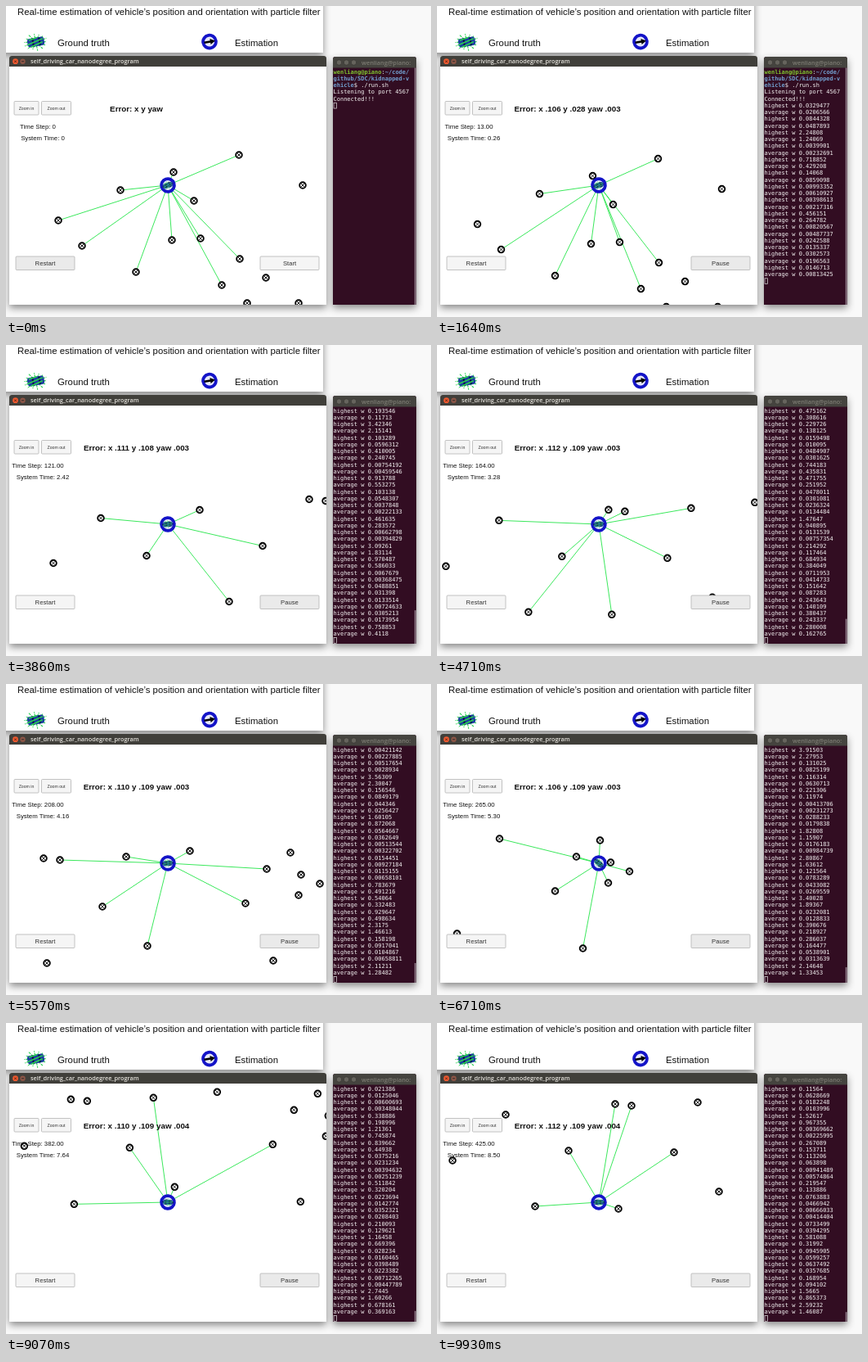
These frames come from a looping animation (520 by 380 pixels, 10000 ms). An HTML page:

```html
<!DOCTYPE html>
<html lang="en">
<head>
<meta charset="utf-8">
<title>Particle filter</title>
<style>
html, body { margin: 0; width: 100%; height: 100%; overflow: hidden; background: #f9f9f9; }
svg { display: block; width: 520px; height: 380px; }
text { font-family: "Liberation Sans", Arial, sans-serif; fill: #111; white-space: pre; }
.head { font-size: 11.35px; }
.bar { font: 600 7.3px "Open Sans", sans-serif; fill: #e4e2dc; }
.error { font-size: 9.8px; font-weight: bold; }
.info { font-size: 7.8px; }
.btn { font-size: 7.7px; fill: #333; }
.zoom { font-size: 5.2px; fill: #333; }
.mid { text-anchor: middle; }
.term text { font: 7px "DejaVu Sans Mono", monospace; fill: #f6f4f4; }
.term .user { fill: #7fc22e; font-weight: bold; }
.term .path { fill: #729fcf; font-weight: bold; }
</style>
</head>
<body>
<svg viewBox="0 0 520 380">
  <defs>
    <filter id="shadow" x="-10%" y="-20%" width="120%" height="150%">
      <feDropShadow dx="0" dy="4" stdDeviation="5" flood-color="#000" flood-opacity=".45"/>
    </filter>
    <clipPath id="view"><rect x="4" y="74" width="388" height="291"/></clipPath>
    <clipPath id="termTitle"><rect x="400" y="62" width="95" height="14"/></clipPath>
    <g id="mark">
      <circle r="3.8" fill="#fff" stroke="#000" stroke-width="1.9"/>
      <path d="M-2.5-2.5L2.5 2.5M-2.5 2.5L2.5-2.5" stroke="#000" stroke-width=".9"/>
    </g>
    <g id="estimate">
      <circle r="7.9" fill="#e6e8fb" stroke="#1414c8" stroke-width="3.8"/>
      <path d="M-6.5-1.3H1V-3.6L7 0L1 3.6V1.3H-6.5Z" fill="#000"/>
    </g>
    <g id="vehicle">
      <rect x="-9" y="-4.6" width="18" height="9.2" rx="3" fill="#1c3fa0"/>
      <path d="M-3-4.6V4.6M4-4V4" stroke="#0b1440" stroke-width="1.8"/>
      <path d="M-9 1.5L8-2.5M-6 4.5L7 1M-7-3L2-4.5" stroke="#2bd152" stroke-width="1.3"/>
    </g>
    <g id="rays" stroke="#2bd152" stroke-width="1" fill="none"></g>
  </defs>

  <rect width="520" height="380" fill="#f9f9f9"/>
  <rect x="-12" y="-20" width="400" height="77" fill="#fff" filter="url(#shadow)"/>
  <text class="head" x="14" y="10.6">Real-time estimation of vehicle’s position and orientation with particle filter</text>
  <g transform="translate(36.5 44) rotate(-10) scale(1.15)">
    <use href="#rays"/><use href="#vehicle"/>
  </g>
  <text class="head" x="63" y="49">Ground truth</text>
  <use href="#estimate" transform="translate(249 43.6) rotate(-10)"/>
  <text class="head" x="280" y="49">Estimation</text>

  <path d="M4 365V64Q4 61 7 61H389Q392 61 392 64V365Z" fill="#fff" filter="url(#shadow)"/>
  <path d="M4 74V64Q4 61 7 61H389Q392 61 392 64V74Z" fill="#403f3a"/>
  <circle cx="11.5" cy="67.7" r="3.4" fill="#ee5a30"/>
  <path d="M10.2 66.4l2.6 2.6m0-2.6l-2.6 2.6" stroke="#4a1a0c" stroke-width=".8"/>
  <circle cx="20.5" cy="67.7" r="3.2" fill="#8b5546"/>
  <path d="M19 67.7h3" stroke="#2c2b28" stroke-width=".9"/>
  <text class="bar" x="30" y="70.4">self_driving_car_nanodegree_program</text>

  <g clip-path="url(#view)">
    <path id="beams" stroke="#3be85c" fill="none"/>
    <g id="marks"></g>
    <g id="car">
      <use href="#estimate"/>
      <use href="#rays" transform="scale(.55)"/>
      <use href="#vehicle" transform="scale(.65)"/>
    </g>
    <text id="error" class="error mid" x="159.5" y="129.2"></text>
    <text id="step" class="info mid" x="39" y="149.5"></text>
    <text id="clock" class="info mid" x="45" y="164"></text>
    <g fill="#f5f5f5" stroke="#b4b4b4" stroke-width=".8">
      <rect x="10" y="116.5" width="30" height="16.5" rx="1"/>
      <rect x="43.5" y="116.5" width="36" height="16.5" rx="1"/>
      <rect id="restartFace" x="12" y="306" width="72" height="16.5" rx="1"/>
      <rect id="runFace" x="311" y="306" width="72" height="16.5" rx="1"/>
    </g>
    <text class="zoom mid" x="25" y="126.8">Zoom in</text>
    <text class="zoom mid" x="61.5" y="126.8">Zoom out</text>
    <text class="btn mid" x="48" y="317">Restart</text>
    <text id="run" class="btn mid" x="347" y="317"></text>
  </g>

  <path d="M400 365V65Q400 62 403 62H499Q502 62 502 65V365Z" fill="#300a24" filter="url(#shadow)"/>
  <path d="M400 75.5V65Q400 62 403 62H499Q502 62 502 65V75.5Z" fill="#45443f"/>
  <g fill="#66645d" stroke="#33322e" stroke-width=".6">
    <circle cx="407.5" cy="69" r="3.2"/><circle cx="416.5" cy="69" r="3.2"/><circle cx="425.5" cy="69" r="3.2"/>
  </g>
  <text class="bar" x="435" y="71.6" style="fill:#7d7b73" clip-path="url(#termTitle)">wenliang@piano: ~/code</text>
  <g class="term" id="term"></g>
  <rect id="caret" x="401" width="3.6" height="6.8" fill="none" stroke="#ddd" stroke-width=".7"/>
  <rect id="thumb" x="499.8" width="1.8" fill="#8d7a86"/>
  <path id="mouse" d="M0 0V10L2.4 7.8L4 11.4L5.6 10.7L4 7.2H7Z" fill="#111" stroke="#fff" stroke-width=".7"/>
</svg>
<script>
const LOOP = 10000, FPS = 14, START = 1285;
const CX = 198, CY = 219, RANGE = 146.8;
const TOP = 82.6, PITCH = 8.25, ROWS = 34;
const $ = id => document.getElementById(id);

// landmark positions on the stage when the car stands at its start
const landmarks = [
  [205,203],[285,182],[140,225],[230,238],[363,219],[64,262],[93,293],[203,286],[238,284],
  [286,309],[159,325],[264,341],[318,332],[295,363],[358,363],[421,164],[477,210],[448,326],
  [542,154],[676,141],[696,143],[619,198],[578,266],[777,139],[855,132],[949,154],[978,134],
  [991,161],[1014,172],[988,186],[923,196],[748,200],[803,248],[680,269],[957,266]
];

// key points of the drive: time, step, position and velocity per step
const drive = [
  { t: 1360, s: 0, p: [0, 0], v: [.85, -.28] },
  { t: 2640, s: 61, p: [116, -28], v: [2.7, -.45] },
  { t: 3860, s: 121, p: [305, -47.5], v: [3.55, -.27] },
  { t: 5570, s: 208, p: [630, -72], v: [3.5, -.2] },
  { t: 6710, s: 265, p: [778.5, -57], v: [1.82, 1.64] },
  { t: 7460, s: 301.5, p: [795, 24.5], v: [-1.07, 2.2] },
  { t: 8210, s: 338, p: [721, 62], v: [-2.5, -.44] },
  { t: 9930, s: 425, p: [458, 42], v: [-3.3, -.05] }
];

const rand = n => { const v = Math.sin(n * 127.1 + 11.7) * 43758.5453; return v - Math.floor(v); };

function sixDigits(v) {
  if (v >= 1e-4) return String(+v.toPrecision(6));
  return v.toExponential(5).replace(/-(\d)$/, "-0$1");
}

const intro = [
  '<tspan class="user">wenliang@piano</tspan>:<tspan class="path">~/code/</tspan>',
  '<tspan class="path">github/SDC/kidnapped-v</tspan>',
  '<tspan class="path">ehicle</tspan>$ ./run.sh',
  "Listening to port 4567",
  "Connected!!!"
];

// each step prints its highest and average particle weight
function termLine(i) {
  if (i < intro.length) return intro[i];
  const k = i - intro.length, n = (k >> 1) + 1;
  const high = 4 * Math.exp(-7 * rand(n));
  return k % 2 ? "average w " + sixDigits(high * (.53 + .12 * rand(n + 900)))
               : "highest w " + sixDigits(high);
}

function carAt(t) {
  let i = 0;
  while (i < drive.length - 2 && t >= drive[i + 1].t) i++;
  const a = drive[i], b = drive[i + 1], h = b.s - a.s;
  const raw = a.s + h * Math.min(1, Math.max(0, (t - a.t) / (b.t - a.t)));
  const step = Math.round(raw), u = (step - a.s) / h;
  const axis = k => {
    const p = a.p[k], q = b.p[k], m = a.v[k] * h, n = b.v[k] * h;
    const c3 = 2 * (p - q) + m + n, c2 = 3 * (q - p) - 2 * m - n;
    return [((c3 * u + c2) * u + m) * u + p, (3 * c3 * u + 2 * c2) * u + m];
  };
  const [x, dx] = axis(0), [y, dy] = axis(1);
  return { step, x, y, angle: Math.atan2(dy, dx) * 180 / Math.PI };
}

// the estimate settles near a constant offset
function errorText(step) {
  const errors = [
    .109 + .003 * Math.cos((step - 150) * Math.PI / 140),
    .109 - .085 * Math.exp(-((step / 58) ** 2)),
    .0025 + step / 303000
  ].map(v => v.toFixed(3).slice(1));
  return `Error: x ${errors[0]} y ${errors[1]} yaw ${errors[2]}`;
}

let rays = "";
for (let i = 0; i < 14; i++) {
  const a = i / 14 * 2 * Math.PI + .2, r = 10 + 3.5 * rand(i + 5);
  rays += `M0 0L${(r * Math.cos(a)).toFixed(1)} ${(r * .7 * Math.sin(a)).toFixed(1)}`;
}
$("rays").innerHTML = `<path d="${rays}" stroke-dasharray="3 .8"/>`;
$("marks").innerHTML = landmarks.map(() => '<use href="#mark"/>').join("");
const marks = [...$("marks").children];
$("term").innerHTML = Array.from({ length: ROWS },
  (_, i) => `<text x="400.5" y="${(TOP + i * PITCH).toFixed(2)}"></text>`).join("");
const rows = [...$("term").children];

const place = (el, x, y, rest = "") => el.setAttribute("transform", `translate(${x} ${y})${rest}`);

function drawMap(car) {
  let beams = "";
  landmarks.forEach(([lx, ly], i) => {
    const x = lx - car.x, y = ly - car.y;
    place(marks[i], x, y);
    if (Math.hypot(x - CX, y - CY) < RANGE) beams += `M${CX} ${CY}L${x} ${y}`;
  });
  $("beams").setAttribute("d", beams);
  place($("car"), CX, CY, ` rotate(${car.angle})`);
}

function drawLabels(step, started) {
  const on = step > 0;
  $("error").textContent = on ? errorText(step) : "Error: x y yaw";
  $("step").textContent = "Time Step: " + (on ? step.toFixed(2) : "0");
  $("clock").textContent = "System Time: " + (on ? (step * .02).toFixed(2) : "0");
  $("run").textContent = started ? "Pause" : "Start";
  $("runFace").setAttribute("fill", started ? "#eaeaea" : "#f5f5f5");
  $("restartFace").setAttribute("fill", started ? "#f5f5f5" : "#eaeaea");
}

function drawTerminal(step) {
  const total = intro.length + 2 * step, first = Math.max(0, total - ROWS);
  rows.forEach((row, i) => row.innerHTML = first + i < total ? termLine(first + i) : "");
  $("caret").setAttribute("y", TOP - 5.6 + (total - first) * PITCH);
  const size = 289.5 * Math.min(1, (ROWS + 1) / (total + 1));
  $("thumb").setAttribute("y", 365 - size);
  $("thumb").setAttribute("height", size);
}

function draw(t) {
  const car = carAt(t), started = t >= START;
  drawMap(car);
  drawLabels(car.step, started);
  drawTerminal(car.step);

  // pointer glides to the button
  const u = Math.min(1, Math.max(0, (t - 570) / 570)), e = u * u * (3 - 2 * u);
  $("mouse").setAttribute("visibility", t >= 565 && !started ? "visible" : "hidden");
  place($("mouse"), 477 - 129 * e, 357 - 38 * e);
}

let shown = -1;
function tick() {
  const frame = Math.floor((performance.now() % LOOP + 5) * FPS / 1000) % (LOOP / 1000 * FPS);
  if (frame !== shown) draw(frame * 1000 / FPS);
  shown = frame;
  requestAnimationFrame(tick);
}
tick();
</script>
</body>
</html>
```
